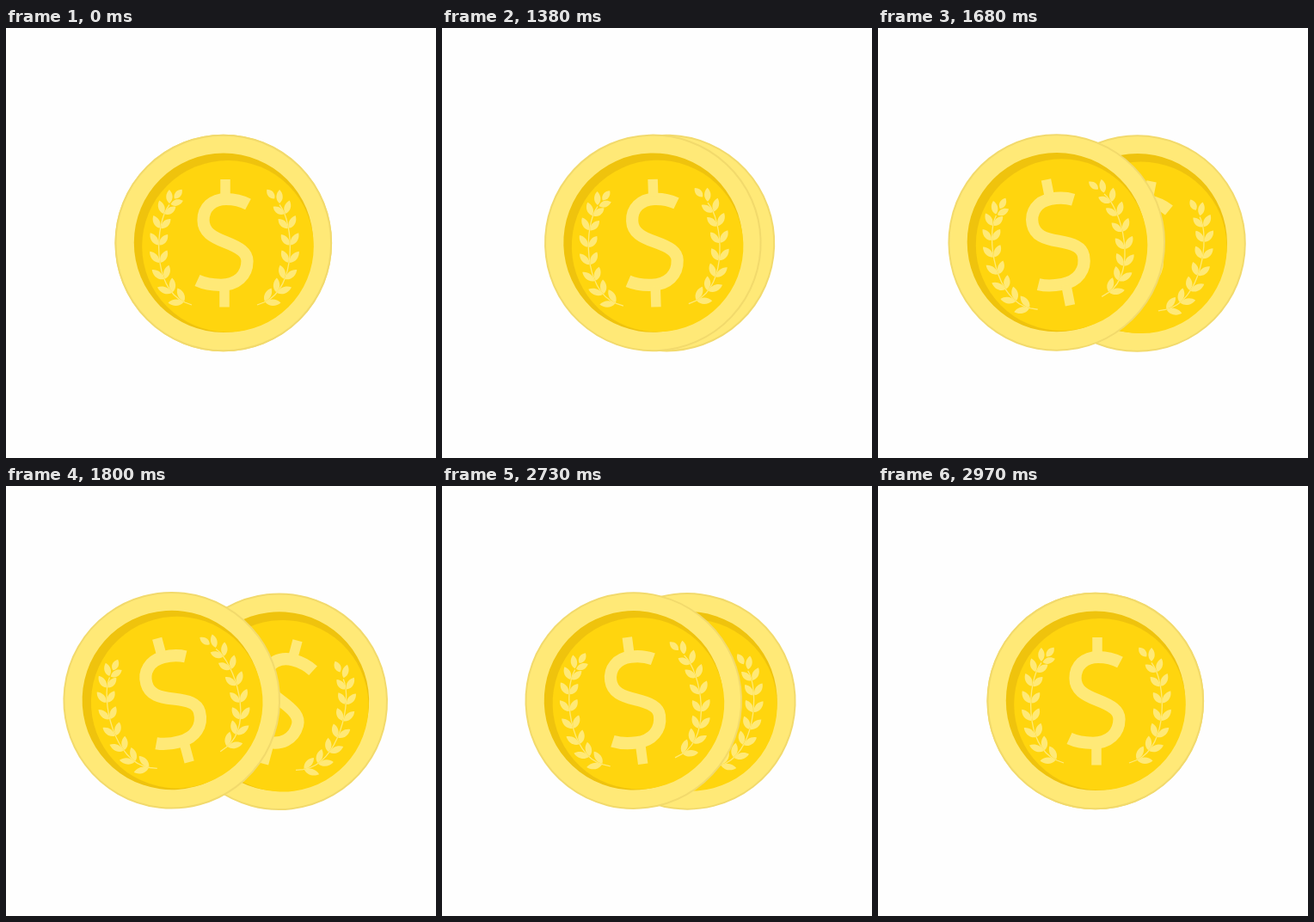
An HTML page for the animation above (4.32 s loop, 500x500 px).

```html
<!DOCTYPE html>
<html lang="en">
<head>
<meta charset="utf-8">
<title>Coins</title>
<style>
  html, body { margin: 0; width: 100%; height: 100%; overflow: hidden; background: #fefefe; }
  svg { display: block; width: 100%; height: 100%; }
</style>
</head>
<body>
<svg viewBox="0 0 500 500">
  <defs>
    <g id="coin">
      <circle cx="252.8" cy="250" r="125.3" fill="#ffe977" stroke="#f2da6c" stroke-width="2"/>
      <circle cx="253" cy="249.7" r="104.2" fill="#efc30d"/>
      <circle cx="258" cy="253.8" r="99.8" fill="#ffd50e"/>
      <g fill="none" stroke="#ffe977">
        <path stroke-width="14.2" d="M281.5 205C273 200.5 264 199 256 199C240 199 229.5 209 229.5 223.5C229.5 237 240 243 255 248.8C272 255.5 280.5 261 280.5 271C280.5 288 268 298.8 250 298.8C240 298.8 230 297 222.5 293.5"/>
        <path stroke-width="11.5" d="M255 176V196M254 301V324.5"/>
      </g>
      <g id="laurels" fill="#ffe977"></g>
    </g>
  </defs>
  <path id="rays" fill="none" stroke="#ffe977" stroke-width="11" stroke-linecap="round"
    d="M250 34V109.5M250 387V468M33 249H117M389 249H463M90 100L149 159M415 99L358 156M150 340L85 404M353 341L419 407"/>
  <use id="back" href="#coin"/>
  <use id="front" href="#coin"/>
</svg>
<script>
const LOOP = 4320, STEP = 30, MOVE = 16, PAIRS = 8;
const $ = id => document.getElementById(id);
const clamp = v => Math.max(0, Math.min(1, v));

// Stem of the left laurel as a cubic curve, bottom to top
const STEM = [[208, 319], [169, 303], [173, 226], [190, 205.5]];

function stemAt(t) {
  const u = 1 - t, [a, b, c, d] = STEM;
  const pos = i => u * u * u * a[i] + 3 * u * u * t * b[i] + 3 * u * t * t * c[i] + t * t * t * d[i];
  const vel = i => u * u * (b[i] - a[i]) + 2 * u * t * (c[i] - b[i]) + t * t * (d[i] - c[i]);
  return { x: pos(0), y: pos(1), angle: Math.atan2(vel(1), vel(0)) * 180 / Math.PI };
}

function leaf(t, turn, length, gap = 1.5) {
  const { x, y, angle } = stemAt(t), end = gap + length;
  return `<path transform="translate(${x} ${y}) rotate(${angle + turn})"
    d="M${gap} 0C${gap + length * .3} -5.6 ${gap + length * .75} -4.2 ${end} 0C${gap + length * .75} 4.2 ${gap + length * .3} 5.6 ${gap} 0"/>`;
}

function growLeaves() {
  const leaves = [leaf(1, 0, 14, 9)];
  for (let i = 0; i < PAIRS; i++) {
    const t = i / (PAIRS - 1), length = 18 - 2 * t;
    leaves.push(leaf(t, -24 - 16 * t, length), leaf(t, 40 - 6 * t, length - 1));
  }
  return leaves;
}

function branch(leaves, transform) {
  return `<g transform="${transform}">${leaves.join('')}
    <path d="M216 322L${STEM[0]}C${STEM.slice(1).join(' ')}" fill="none" stroke="#ffe977" stroke-width="1.3"/></g>`;
}

// The right branch has no inner leaf at the top
const leaves = growLeaves();
$('laurels').innerHTML = branch(leaves, '') +
  branch(leaves.slice(0, -1), 'translate(508 0) scale(-1 1)');

function place(id, dx, angle) {
  $(id).setAttribute('transform', `translate(${dx} 0) rotate(${angle} 250 250)`);
}

function draw(ms) {
  const k = Math.floor((ms % LOOP) / STEP);
  const spread = clamp((k - 44) / MOVE) - clamp((k - 83) / MOVE);
  place('front', -60 * spread, -15 * spread);
  place('back', 65 * spread, 15 * spread);
  $('rays').setAttribute('opacity', k < 30 ? 0 : clamp(1 - (k - 30) / 4));
}

let start;
function tick(now) {
  start ??= now;
  draw(now - start);
  requestAnimationFrame(tick);
}
draw(0);
requestAnimationFrame(tick);
</script>
</body>
</html>
```
